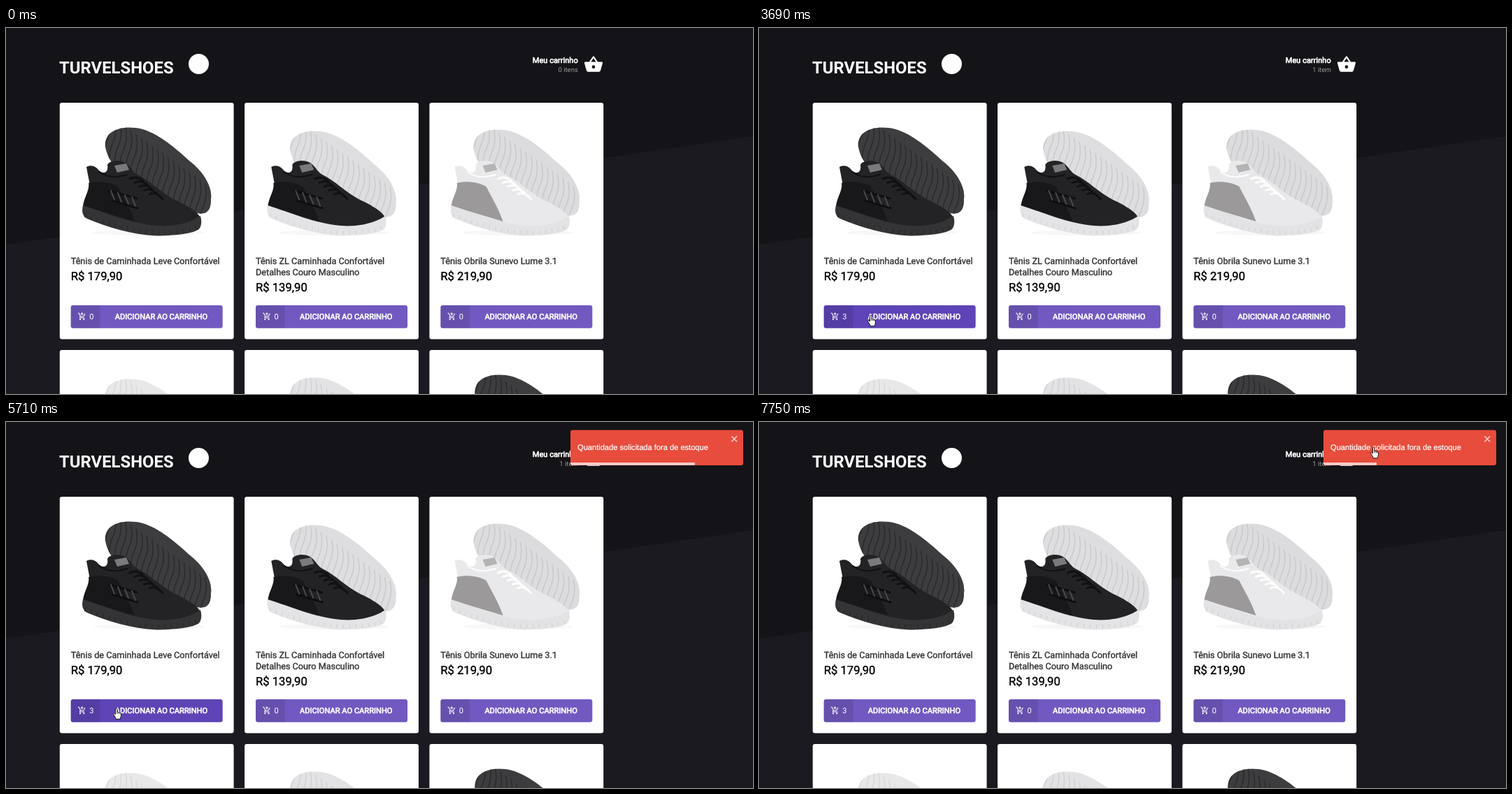
An HTML page for the animation above (8000 ms loop, 1068x524 px).

```html
<!DOCTYPE html>
<html lang="pt-BR">
<head>
<meta charset="utf-8">
<title>Loja</title>
<style>
html, body { margin: 0; width: 100%; height: 100%; overflow: hidden; background: #1b1a20; }
svg { display: block; width: 1068px; height: 524px; }
text { font-family: Roboto, sans-serif; text-rendering: geometricPrecision; white-space: pre; stroke-linejoin: round; }
.title { font-size: 12.69px; fill: #333; stroke: #333; stroke-width: .03em; }
.price { font-size: 16.65px; fill: #000; stroke: #000; stroke-width: .022em; }
.label { font-size: 11.1px; fill: #fff; stroke: #fff; stroke-width: .06em; }
.count { font-size: 11.1px; fill: #fff; }
.items { font-size: 9.5px; fill: #999; }
.logo { font-size: 23.9px; font-weight: 700; fill: #fff; }
.msg { font: 11.1px "Liberation Sans", Arial, sans-serif; fill: #fff; stroke: #fff; stroke-width: .02em; }
</style>
</head>
<body>
<svg id="stage" viewBox="0 0 1068 524" xmlns="http://www.w3.org/2000/svg"></svg>
<script>
const SOLE = 'M142 170C140 149 160 140 186 143C214 147 240 170 262 190C284 207 295 228 293 244C293 256 290 263 284 265C276 267 266 264 256 259L200 232C168 214 146 195 142 170Z';
const UPPER = 'M115 199C120 196 128 197 132 203C138 210 147 208 145 196C148 189 165 188 172 194C178 198 182 208 190 211C206 219 220 234 240 245C258 254 274 262 278 272L270 288L200 290L110 264C111 246 121 232 119 220Z';
const MID = 'M110 254C108 262 109 269 116 273C145 285 180 296 215 297.5C245 297 268 294 276 288C280 283 280 276 278 269C262 280 238 285 214 283C178 280 142 264 110 254Z';
const HEEL = 'M118 222C132 218 150 221 160 227C167 241 177 257 184 277C160 270 135 262 110 255C112 241 120 232 118 222Z';
const CART = 'M11 9h2V6h3V4h-3V1h-2v3H8v2h3zM7.2 14.7L8.1 13h7.5q1.2 0 1.7-1l3.9-7-1.8-1-3.8 7H8.5L4.3 2H1v2h2l3.6 7.6-1.4 2.4Q4.3 17 7 17h12v-2H7.4zM5 20a2 2 0 1 0 4 0a2 2 0 1 0-4 0M15 20a2 2 0 1 0 4 0a2 2 0 1 0-4 0';
const BASKET = 'M17.2 9l-4.4-6.6q-.8-.8-1.6 0L6.8 9H2q-1 0-1 1.2l2.6 9.3Q4 21 5.5 21h13q1.5 0 1.9-1.5l2.6-9.3Q23 9 22 9zM9 9l3-4.4L15 9zM12 17a2 2 0 1 1 0-4a2 2 0 1 1 0 4z';
const HAND = 'M3.5 9V1.6a1.2 1.2 0 0 1 2.4 0V6c.6-.8 2-.6 2.1.3.6-.6 1.8-.4 1.9.5.7-.5 1.6 0 1.6 1v3c0 2-1.2 2.8-1.2 5H4.2C4 13.5 2 11.5.6 9c-.4-1 .8-1.7 1.6-.9z';
const ARROW = 'M0 0V13.5l3.1-2.9 2 4.6 2-.9-2-4.5h4.4z';

const dark = { sole: '#3d3d3f', groove: '#2b2b2d', upper: '#232325', mid: '#343436', rib: '#252527', heel: '#18181a', lace: '#111113', tag: '#98989a', straps: true };
const mixed = { ...dark, sole: '#dedee0', groove: '#cbcbce', mid: '#e4e4e6', rib: '#d0d0d3' };
const light = { sole: '#dcdcde', groove: '#cacacd', upper: '#e9e9eb', mid: '#e3e3e5', rib: '#d0d0d3', heel: '#9c999a', lace: '#fdfdfd', tag: '#a3a1a2' };

const cards = [
  { look: dark, dy: 0, title: ['Tênis de Caminhada Leve Confortável'], price: 'R$ 179,90' },
  { look: mixed, dy: 5, title: ['Tênis ZL Caminhada Confortável', 'Detalhes Couro Masculino'], price: 'R$ 139,90' },
  { look: light, dy: 3, dx: -2, title: ['Tênis Obrila Sunevo Lume 3.1'], price: 'R$ 219,90' },
  { look: { ...light, sole: '#e8e8e9', groove: '#dadadc' }, dy: 6 },
  { look: { ...light, sole: '#e3e3e5', groove: '#d2d2d5' }, dy: 4 },
  { look: dark, dy: 0 }
];

const path = (d, fill, more = '') => `<path d="${d}" fill="${fill}" ${more}/>`;
const line = (d, color, width, more = '') => path(d, 'none', `stroke="${color}" stroke-width="${width}" stroke-linecap="round" ${more}`);
const repeat = (n, make) => Array.from({ length: n }, (_, i) => make(i)).join('');

function shoe({ look: c, dy, dx = 0 }) {
  const grooves = repeat(22, i => `M${148 + i * 7.6} ${126 + i * 5.4}q4 18-3 33t-5 44`);
  const laces = repeat(5, i => `M${177 + i * 7} ${216 + i * 5.5}q9-5 19 ${3 + i}`);
  const straps = repeat(4, i => `M${150 + i * 10} ${233 + i * 3}l5 13`);
  return `<g transform="translate(${dx} ${dy})">
      ${path(SOLE, c.sole)}
      <g clip-path="url(#sole)">${line(grooves, c.groove, 1.6)}</g>
    </g>
    <g transform="translate(${dx} 0)">
      <ellipse cx="205" cy="293" rx="80" ry="4" fill="#000" opacity=".03"/>
      ${path(UPPER, c.upper)}${path(HEEL, c.heel)}
      ${line('M133 206Q150 218 173 210', c.lace, 2)}${line(laces, c.lace, 3)}
      ${path('M155 197L172 194L176 203L159 207Z', c.tag, 'opacity=".75"')}
      ${c.straps ? line('M148 233L187 244M152 247L188 258', '#0e0e10', 3) + line(straps, '#4a4a4d', 2) : ''}
      ${path(MID, c.mid)}
      ${line('M113 268C145 281 180 291 215 293C245 293 266 290 275 284', c.rib, 6, 'stroke-dasharray="1 8" style="stroke-linecap:butt"')}
    </g>`;
}

function details({ title, price }, i) {
  const shift = (title.length - 1) * 16;
  return title.map((s, n) => `<text class="title" x="92.7" y="${337.5 + n * 16}">${s}</text>`).join('') +
    `<text class="price" x="92.7" y="${361 + shift}">${price}</text>
    <rect id="btn${i}" x="92.7" y="397" width="217" height="32.7" rx="3.2" fill="#7159c1"/>
    <path d="M134.5 397H95.9a3.2 3.2 0 0 0-3.2 3.2v26.3a3.2 3.2 0 0 0 3.2 3.2h38.600z" opacity=".1"/>
    <g transform="translate(102.3 406.6) scale(.529)">${path(CART, '#fff')}</g>
    <text class="count" id="count${i}" x="119.2" y="417.4">0</text>
    <text class="label" x="222" y="417.4" text-anchor="middle">ADICIONAR AO CARRINHO</text>`;
}

const grid = cards.map((card, i) =>
  `<g transform="translate(${(i % 3) * 264.3} ${i > 2 ? 354 : 0})">
    <rect x="76.8" y="107" width="248.8" height="338.5" rx="3.2" fill="#fff"/>
    ${shoe(card)}${card.title ? details(card, i) : ''}
  </g>`).join('');

const $ = id => document.getElementById(id);
$('stage').innerHTML = `
  <defs><clipPath id="sole"><path d="${SOLE}"/></clipPath></defs>
  <rect width="1068" height="524" fill="#1b1a20"/>
  ${path('M0 0H1068V155L0 310Z', '#141317')}
  <text class="logo" x="76" y="65">TURVELSHOES</text>
  <circle cx="275.5" cy="51.5" r="14.5" fill="#fff"/>
  <g id="link">
    <text class="label" x="817.8" y="50" text-anchor="end">Meu carrinho</text>
    <text class="items" id="items" x="817.8" y="63" text-anchor="end">0 itens</text>
    <g transform="translate(825.7 37.9) scale(1.189)">${path(BASKET, '#fff', 'fill-rule="evenodd"')}</g>
  </g>
  ${grid}
  <g id="toast">
    <clipPath id="box"><rect x="807" y="11.5" width="247" height="50.5" rx="3"/></clipPath>
    <g clip-path="url(#box)">
      <rect x="807" y="11" width="247" height="52" fill="#e74c3c"/>
      <rect id="bar" x="807" y="58" height="4" fill="#fff" opacity=".7"/>
    </g>
    <text class="msg" x="817" y="40">Quantidade solicitada fora de estoque</text>
    ${line('M1037.7 20.7l7 7m0-7l-7 7', '#fff', 1.4, 'opacity=".8"')}
  </g>
  <circle id="ring" cx="159.5" cy="412.5" r="9.5" fill="#ff0" opacity=".47"/>
  <g id="cursor" stroke="#000" stroke-width=".9" stroke-linejoin="round">
    <g id="hand" transform="translate(-4.7 0)">${path(HAND, '#fff')}
      <path d="M5.9 6v2.5M8 6.5v2M9.9 7v1.8" fill="none" stroke-width=".7"/></g>
    <g id="arrow">${path(ARROW, '#fff')}</g>
  </g>`;

const LOOP = 8000;
const FADE = 185;
// start, end, from, bend, to
const moves = [
  [270, 1090, [1003, 505], [500, 66], [112, 428]],
  [1090, 1310, [112, 428], [112, 424], [115.7, 421]],
  [1460, 1640, [115.7, 421], [138, 416], [159.7, 412]],
  [1920, 1950, [159.7, 412], [159.7, 412], [159.7, 411]],
  [4910, 4940, [159.7, 411], [159, 410], [157.7, 409.5]],
  [6000, 6820, [157.7, 409.5], [440, 200], [800, 57]],
  [6820, 7050, [800, 57], [830, 45], [856.7, 32]],
  [7250, 7540, [856.7, 32], [876, 33], [892, 36]],
  [7540, 7750, [892, 36], [886, 37], [878.7, 36]]
];
const clicks = [[2010, 2110], [2620, 2770], [3590, 3690], [4840, 4940]];
const counts = [2460, 2770, 3690];
const bounce = [[0, 3000], [.6, -25], [.75, 10], [.9, -5], [1, 0]];
const TOAST = { start: 4979.5, span: 647, scale: .78, pause: 6856 };

const clamp = v => Math.max(0, Math.min(1, v));
const smooth = u => u * u * (3 - 2 * u);
const easeOut = u => 1 - (1 - u) ** 3;
const fade = (t, on, off) => clamp((t - on) / FADE) * (1 - clamp((t - off) / FADE));
const mix = (a, b, k) => a.map((v, i) => Math.round(v + (b[i] - v) * k));
const within = ([x, y], l, t, r, b) => x >= l && x <= r && y >= t && y <= b;
const show = (id, on) => $(id).setAttribute('visibility', on ? 'inherit' : 'hidden');
const write = (id, s) => { if ($(id).textContent !== s) $(id).textContent = s; };

function cursorAt(t) {
  const [t0, t1, a, b, c] = moves.filter(m => t >= m[0]).pop() || moves[0];
  const s = smooth(clamp((t - t0) / (t1 - t0)));
  return a.map((v, i) => v * (1 - s) ** 2 + 2 * b[i] * s * (1 - s) + c[i] * s * s);
}

function toastShift(u) {
  const i = Math.max(1, bounce.findIndex(k => u <= k[0]));
  const [[u0, x0], [u1, x1]] = [bounce[i - 1], bounce[i]];
  return (x0 + (x1 - x0) * easeOut((u - u0) / (u1 - u0))) * TOAST.scale;
}

function draw(t) {
  const pos = cursorAt(t);
  const open = t >= TOAST.start;
  const hand = within(pos, 93, 397, 310, 430) || within(pos, 752, 38, 854, 66) ||
    (open && within(pos, 807, 11, 1054, 62));
  $('cursor').setAttribute('transform', `translate(${pos})`);
  show('cursor', t >= 270);
  show('hand', hand);
  show('arrow', !hand);
  show('ring', clicks.some(([on, off]) => t >= on && t < off));

  const n = counts.filter(at => t >= at).length;
  write('count0', String(n));
  write('items', n ? '1 item' : '0 itens');
  $('btn0').setAttribute('fill', `rgb(${mix([113, 89, 193], [94, 68, 182], fade(t, 1000, 6080))})`);
  $('link').setAttribute('opacity', 1 - .3 * fade(t, 6735, 6870));

  show('toast', open);
  if (open) {
    const u = clamp((t - TOAST.start) / TOAST.span);
    $('toast').setAttribute('transform', `translate(${toastShift(u)} 0)`);
    $('toast').setAttribute('opacity', easeOut(clamp(u / .6)));
    $('bar').setAttribute('width', 178 - .089 * (Math.min(t, TOAST.pause) - 5710));
  }
}

const begin = performance.now();
function tick() {
  draw((performance.now() - begin) % LOOP);
  requestAnimationFrame(tick);
}
tick();
</script>
</body>
</html>
```
